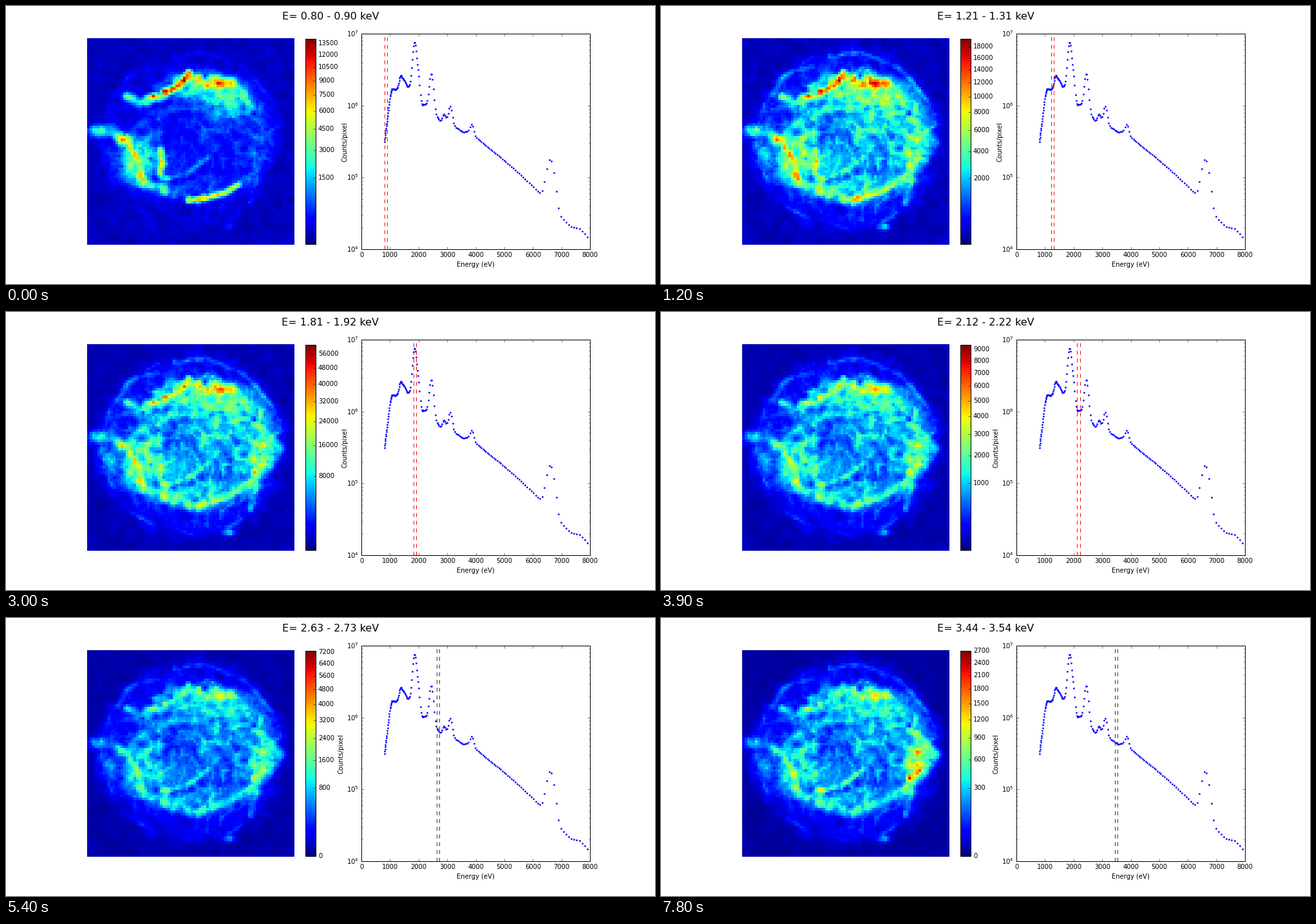
A matplotlib script for the animation above (8 s loop, 1008x432 px).

```python
import numpy as np
import matplotlib.pyplot as plt
from matplotlib.animation import FuncAnimation

W, H, DPI = 1008, 432, 72
TICK_MS, LOOP_MS, HOLD = 100, 8000, 3
BANDS, N = 27, 80

plt.style.use("classic")
plt.rcParams.update({
    "font.family": "DejaVu Sans", "font.size": 10, "mathtext.fontset": "dejavusans",
    "figure.facecolor": "white", "xtick.labelsize": 10, "ytick.labelsize": 10,
})

# ---------------------------------------------------------------- spectrum
# continuum as (eV, log10 counts), emission lines as (eV, width, counts)
CONTINUUM = np.array([
    (800, 5.5), (900, 5.8), (1000, 6.13), (1060, 6.23), (1200, 6.225), (1650, 6.26),
    (2130, 6.01), (2260, 6.02), (2750, 5.79), (2990, 5.82), (3300, 5.70), (3550, 5.63),
    (3730, 5.64), (4000, 5.56), (5000, 5.236), (5560, 5.04), (6270, 4.77),
    (7000, 4.44), (7300, 4.32), (7650, 4.28), (7915, 4.17)])
LINES = [(1370, 52, 8.6e5), (1490, 55, 4.5e5), (1857, 65, 6.2e6), (1995, 40, 1.1e6),
         (2440, 62, 1.95e6), (2880, 45, 1.2e5), (3110, 55, 3.8e5), (3860, 60, 1.45e5),
         (6605, 122, 1.38e5)]


def counts(ev):
    total = 10 ** np.interp(ev, *CONTINUUM.T)
    for center, width, height in LINES:
        total = total + height * np.exp(-((ev - center) / width) ** 2 / 2)
    return total


# ---------------------------------------------------------------- energy bands
band = np.arange(BANDS)
STEP = 7100 / 70
LOW = 800 + band * STEP
HIGH = LOW + STEP
KEYS = [0, 4, 8, 13, 18, 22, 26]
PEAK = np.array([14153, 19430, 16834, 9409, 7291, 4102, 2708])


def over_bands(values):
    return np.interp(band, KEYS, values)


band_mean = counts(LOW[:, None] + STEP * np.linspace(0, 1, 9)).mean(axis=1)
VMAX = band_mean * np.exp(over_bands(np.log(PEAK / band_mean[KEYS])))
VMIN = 30 * np.clip(1 - band / 16, 0, 1)
CONTRAST = over_bands([1, 1, .95, .82, .72, .95, .8])


def glow(start, end, dip):
    """Brightness over the bands: a slope, dimmed by dip in the softest ones."""
    return (start + (end - start) * band / (BANDS - 1)) * CONTRAST * (1 - dip * np.exp(-band / 2))


SOFT = glow(1, .5, 0)
MAIN = glow(1, .85, .1)
FAINT = glow(1, .95, .58)
HARD = glow(.65, 1.1, .2)
LOBE = glow(.6, 1.2, .75)

# ---------------------------------------------------------------- sky map
cell = (np.arange(N) + .5) / N
X, Y = np.meshgrid(126 + 322 * cell, 50 + 321 * cell)
rng = np.random.default_rng(12)


def smooth_noise(sigma):
    f = np.fft.fftfreq(N)
    k = np.exp(-2 * (np.pi * sigma) ** 2 * (f[:, None] ** 2 + f ** 2))
    n = np.fft.ifft2(np.fft.fft2(rng.standard_normal((N, N))) * k).real
    return n / n.std()


def blob(x, y, sx, sy):
    return np.exp(-((X - x) / sx) ** 2 / 2 - ((Y - y) / sy) ** 2 / 2)


def stroke(width, *pts):
    best = np.full((N, N), 1e9)
    for (x0, y0), (x1, y1) in zip(pts, pts[1:]):
        dx, dy = x1 - x0, y1 - y0
        s = np.clip(((X - x0) * dx + (Y - y0) * dy) / (dx * dx + dy * dy), 0, 1)
        best = np.minimum(best, np.hypot(X - x0 - s * dx, Y - y0 - s * dy))
    return np.exp(-(best / width) ** 2 / 2)


def radius(x, y, rx, ry):
    return np.hypot((X - x) / rx, (Y - y) / ry)


def disk(r, soft):
    return 1 / (1 + np.exp((r - 1) / soft))


web = np.exp(-(smooth_noise(2) / .45) ** 2)
drift = smooth_noise(3)
texture = 1 + .1 * smooth_noise(.5) + .13 * smooth_noise(1.1)
holes = 1 - .45 * blob(262, 188, 22, 22) - .25 * blob(335, 255, 25, 20)
inner = disk(radius(302, 202, 122, 106) + .04 * drift, .06) * holes * (.85 + .35 * web)
r_shell = radius(288, 208, 146, 144) + .02 * drift
outer = disk(r_shell, .07) * (.85 + .35 * web)
shell = np.exp(-((r_shell - .95) / .035) ** 2) * np.clip(.6 + .5 * smooth_noise(4), 0, 1)

LAYERS = [
    (FAINT * .40, inner),
    (FAINT * .15 + .02, outer),
    (FAINT * .20, shell),
    # northern rim
    (MAIN * .47, blob(305, 125, 42, 17)),
    (MAIN * .44, blob(340, 148, 28, 25)),
    (MAIN * .60, stroke(8, (268, 118), (300, 114), (350, 122))),
    (MAIN * .62, blob(322, 121, 18, 7)),
    (SOFT * .80, stroke(5, (247, 134), (262, 127), (275, 118), (284, 105))),
    (MAIN * .45, stroke(9, (350, 120), (366, 135), (380, 162))),
    # north-western knot
    (MAIN * 1.0, blob(231, 141.5, 8, 4)),
    (MAIN * .48, stroke(6, (188, 140), (210, 150), (248, 139))),
    # western arm
    (MAIN * .48, blob(203, 240, 24, 30)),
    (MAIN * .42, stroke(8, (138, 195), (165, 195), (190, 212), (212, 275), (245, 285))),
    (MAIN * .62, stroke(5, (174, 201), (190, 214), (206, 238), (214, 274))),
    (SOFT * .70, blob(185, 209, 9, 7)),
    (HARD * .85, blob(206, 244, 5, 7)),
    (SOFT * .50, stroke(5, (238, 262), (243, 245), (240, 222))),
    (FAINT * .42, blob(160, 228, 14, 18)),
    # southern filaments
    (HARD * .80, blob(250, 267, 9, 3)),
    (HARD * .48, stroke(4, (226, 280), (243, 267), (280, 262), (314, 234))),
    (SOFT * .58, stroke(4, (284, 301), (312, 298), (338, 291), (361, 278))),
    (FAINT * .42, stroke(8, (225, 284), (300, 300), (375, 270))),
    # eastern lobe
    (LOBE * .52, blob(396, 222, 18, 22)),
    (LOBE * .42, stroke(8, (382, 165), (424, 213), (382, 262))),
    (LOBE * .66, stroke(5, (384, 249), (402, 236))),
    (LOBE * .62, blob(402, 209, 7, 6)),
    (FAINT * .38, stroke(5, (384, 225), (389, 265), (380, 305))),
    # outer wisps
    (FAINT * .28, stroke(4, (176, 138), (188, 113), (208, 101), (235, 95))),
    (FAINT * .26, stroke(4, (262, 78), (310, 72), (372, 98), (413, 147))),
    (FAINT * .38, blob(345, 342, 9, 5)),
]


def sky_map(n):
    p = 3.5
    total = (.055 - .001 * n) ** p + sum((gain[n] * shape) ** p for gain, shape in LAYERS)
    t = total ** (1 / p) * texture
    noise = np.random.default_rng(100 + n).standard_normal((N, N))
    return np.clip(t + noise * (.003 + .03 * t), 0, 1)


MAPS = [sky_map(n) for n in band]

# ---------------------------------------------------------------- layout
fig = plt.figure(figsize=(W / DPI, H / DPI), dpi=DPI)


def box(x0, y0, x1, y1):
    return fig.add_axes([x0 / W, 1 - y1 / H, (x1 - x0) / W, (y1 - y0) / H])


def show(axes, data, **kw):
    return axes.imshow(data, cmap="jet", vmin=0, vmax=1, interpolation="nearest",
                       aspect="auto", **kw)


ax_map = box(126, 50, 448, 371)
ax_map.axis("off")
image = show(ax_map, MAPS[0])

ax_bar = box(465, 51, 481, 370)
show(ax_bar, np.linspace(0, 1, 256)[:, None], origin="lower", extent=(0, 1, 0, 1))
ax_bar.set_xticks([])
ax_bar.yaxis.tick_right()

ax = box(126 + 781.2 * 1.2 / 2.2, 43.2, 907.2, 378)
energies = np.geomspace(800, 7915, 185)
ax.semilogy(energies, counts(energies), "o", color="b", ms=2.2, mec="b", mew=.5)
ax.set_xlim(0, 8000)
ax.set_ylim(1e4, 1e7)
edges = [ax.axvline(0, ls="--", lw=1) for _ in range(2)]

title = fig.text(.5, 1 - 21.2 / H, "", size=16, ha="center", va="baseline")
fig.text(729.6 / W, 1 - 405.3 / H, "Energy (eV)", ha="center", va="baseline")
bar_label = fig.text(0, 1 - 211 / H, "Counts/pixel", rotation=90, ha="center", va="center")


def bar_ticks(lo, hi):
    raw = (hi - lo) / 10
    unit = 10 ** np.floor(np.log10(raw))
    step = unit * next(s for s in (1, 1.5, 2, 2.5, 3, 4, 5, 6, 8, 10) if s * unit >= raw)
    v = np.arange(0, hi, step)
    return v[v >= lo]


def update(i):
    n = i // HOLD
    image.set_data(MAPS[n])
    values = bar_ticks(VMIN[n], VMAX[n])
    ax_bar.set_yticks(np.sqrt((values - VMIN[n]) / (VMAX[n] - VMIN[n])),
                      [f"{v:.0f}" for v in values])
    ax_bar.set_ylim(0, 1)
    bar_label.set_x((526 if values[-1] >= 10000 else 520) / W)
    for line, ev in zip(edges, (LOW[n], HIGH[n])):
        line.set_xdata([ev, ev])
        line.set_color("red" if n <= 13 else "#333333")
    title.set_text(f"E= {LOW[n] / 1000:.2f} - {HIGH[n] / 1000:.2f} keV")
    return []


anim = FuncAnimation(fig, update, frames=LOOP_MS // TICK_MS, interval=TICK_MS,
                     repeat=True, repeat_delay=0, blit=False)
plt.show()
```
